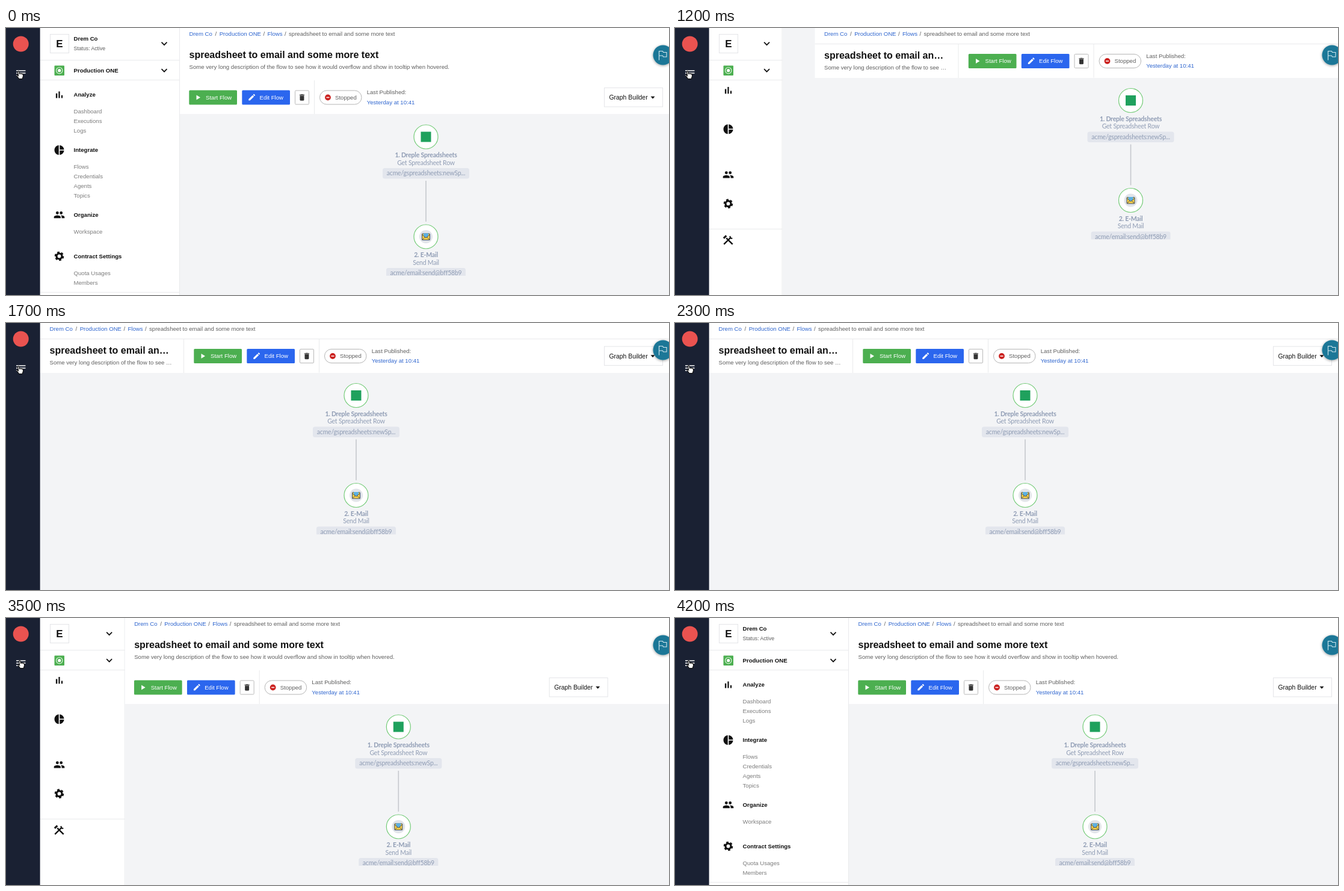
Recreate the animation shown at these times as an HTML page. Size 1102x444 px, loop 4400 ms.

```html
<!DOCTYPE html>
<html lang="en">
<head>
<meta charset="utf-8">
<title>Collapsing side menu</title>
<style>
  html, body { margin: 0; width: 100%; height: 100%; overflow: hidden; background: #f3f4f6; }
  svg { display: block; width: 1102px; height: 444px; }
  text { font: 9.6px "Liberation Sans", Arial, sans-serif; fill: #5f5f5f; white-space: pre; }
  .b { font-weight: bold; fill: #111; }
  .title { font-size: 16px; }
  .link { fill: #2f66cf; }
  .sub { fill: #7c7c7c; }
  .on { fill: #fff; }
  .rule { stroke: #e9eaec; fill: none; }
  .box { stroke: #e4e5e8; fill: #fff; }
  .graph text { font: 10.5px Lato, sans-serif; letter-spacing: -.2px; fill: #8f9cb4; text-anchor: middle; }
  .graph .h { font-weight: bold; }
  .tag { fill: #e3e6ed; }
  .ring { fill: #fff; stroke: #74cb78; stroke-width: 1.2; }
  .chev { fill: none; stroke: #111; stroke-width: 1.7; }
</style>
</head>
<body>
<svg viewBox="0 0 1102 444">
  <defs>
    <clipPath id="sideClip"><rect id="sideCut" x="56" y="0" width="233" height="444"/></clipPath>
    <clipPath id="graphClip"><rect x="-200" y="143" width="400" height="269"/></clipPath>
    <filter id="shade" x="-30%" y="-30%" width="160%" height="160%">
      <feDropShadow dx="0" dy="1" stdDeviation="2" flood-opacity=".4"/>
    </filter>
  </defs>
  <rect width="1102" height="444" fill="#f3f4f6"/>

  <g id="graph" class="graph"><g clip-path="url(#graphClip)">
    <path d="M0 254V322" stroke="#c5c8cd" stroke-width="1.6"/>
    <circle class="ring" cy="181" r="20"/>
    <rect x="-8.500" y="172.500" width="17" height="17" fill="#1fa15d"/>
    <text class="h" y="215">1. Dreple Spreadsheets</text>
    <text y="227.500">Get Spreadsheet Row</text>
    <rect class="tag" x="-72" y="233" width="144" height="17.500" rx="3.500"/>
    <text y="245">acme/gspreadsheets:newSp...</text>
    <circle class="ring" cy="347" r="20"/>
    <circle cy="347" r="11" fill="#e1e4e9"/>
    <rect x="-6.500" y="342" width="13" height="10.500" rx="1" fill="#fbcf45" stroke="#3d4c60"/>
    <path d="M-4 341.500H4V345.500L0 348.500L-4 345.500Z" fill="#5bb0e2"/>
    <path d="M-6.500 343.500L0 349L6.500 343.500M-6.500 352.500L-1.800 348M6.500 352.500L1.800 348" fill="none" stroke="#3d4c60"/>
    <text class="h" y="381">2. E-Mail</text>
    <text y="393.500">Send Mail</text>
    <rect class="tag" x="-66" y="399" width="132" height="17.500" rx="3.500"/>
    <text y="411">acme/email:send@bff58b9</text>
  </g></g>

  <g id="main">
    <rect id="head" width="1045" height="143" fill="#fff"/>
    <g>
      <text class="link" x="15.500" y="13">Drem Co</text><text x="58.500" y="13">/</text>
      <text class="link" x="65.700" y="13">Production ONE</text><text x="138.500" y="13">/</text>
      <text class="link" x="145.500" y="13">Flows</text><text x="174" y="13">/</text>
      <text x="181" y="13">spreadsheet to email and some more text</text>
    </g>
    <g id="wideTitle">
      <text class="b title" x="15.500" y="50">spreadsheet to email and some more text</text>
      <text x="15.500" y="67.700">Some very long description of the flow to see how it would overflow and show in tooltip when hovered.</text>
    </g>
    <g id="slimTitle">
      <path class="rule" d="M0 26.500H1045M238.500 27V83"/>
      <text class="b title" x="15.500" y="50.700">spreadsheet to email an…</text>
      <text x="15.500" y="68.700">Some very long description of the flow to see …</text>
    </g>
    <g id="tools">
      <rect x="15.300" y="103.500" width="79.700" height="24" rx="1.500" fill="#4caf50"/>
      <path d="M27.500 111.500V119.500L34 115.500Z" fill="#fff"/>
      <text class="on" x="43" y="118.800">Start Flow</text>
      <rect x="103.300" y="103.500" width="79.700" height="24" rx="1.500" fill="#2b66ee"/>
      <path transform="translate(112.500 108) scale(.6)" fill="#fff" d="M3 17.250V21h3.750L17.810 9.940l-3.750-3.750zM20.710 7.040c.39-.39.39-1.020 0-1.410l-2.340-2.340c-.39-.39-1.020-.39-1.410 0l-1.830 1.830 3.750 3.750z"/>
      <text class="on" x="132.500" y="118.800">Edit Flow</text>
      <rect x="191.500" y="104" width="23" height="23" rx="1.500" fill="#fff" stroke="#b9b9b9"/>
      <path transform="translate(196 108.500) scale(.58)" fill="#333" d="M6 19c0 1.100.9 2 2 2h8c1.100 0 2-.9 2-2V7H6zM19 4h-3.500l-1-1h-5l-1 1H5v2h14z"/>
      <path class="rule" d="M223.500 87V143"/>
      <rect x="232.500" y="104" width="69.500" height="23" rx="11.500" fill="#fff" stroke="#b5b5b5"/>
      <circle cx="246" cy="115.500" r="4.900" fill="#cb2220"/>
      <path d="M243.500 115.500h5" stroke="#fff" stroke-width="1.500"/>
      <text x="258" y="118.800">Stopped</text>
      <text x="310.700" y="110.300">Last Published:</text>
      <text class="link" x="310.700" y="126.700">Yesterday at 10:41</text>
    </g>
    <g id="builder">
      <rect class="box" x="705.500" y="99.500" width="97" height="31.500"/>
      <text x="713.500" y="119" style="font-size:10.400px;fill:#111">Graph Builder</text>
      <path d="M782.500 113.700h7l-3.500 4z" fill="#111"/>
    </g>
  </g>

  <g clip-path="url(#sideClip)">
    <rect x="56" width="233" height="444" fill="#fff"/>
    <path class="rule" d="M57 53.500H289M57 86.500H289"/>
    <rect class="box" x="73.500" y="10.500" width="31" height="31"/>
    <text class="b" x="88.800" y="32" text-anchor="middle" style="font-size:17px">E</text>
    <rect x="80.500" y="62.500" width="16.500" height="16.500" rx="1" fill="#4caf50"/>
    <circle cx="88.700" cy="70.700" r="5.200" fill="none" stroke="#d8f2d9" stroke-width="1.200"/>
    <circle cx="88.700" cy="70.700" r="2.600" fill="#fff"/>
    <g class="label">
      <text class="b" x="112.500" y="21">Drem Co</text>
      <text x="112.500" y="36.700" style="font-size:8.700px">Status: Active</text>
      <text class="b" x="112.500" y="73.700">Production ONE</text>
    </g>
    <g id="edge">
      <path class="chev" d="M-30.500 23.700l4.500 4.500l4.500-4.500M-30.500 68.200l4.500 4.500l4.500-4.500"/>
      <path class="rule" d="M-.5 0V444"/>
    </g>
    <g id="menu"></g>
  </g>

  <rect width="56.600" height="444" fill="#1a2133"/>
  <circle cx="24.700" cy="26.500" r="13" fill="#ea5350"/>
  <path d="M17 71h15.500M17 75h15.500M17 79h8" stroke="#fff" stroke-width="1.500"/>
  <g id="ripple" fill="none">
    <circle r="1" stroke="#c9c4b4" stroke-width="3" vector-effect="non-scaling-stroke"/>
    <circle r="1" stroke="#15171d" stroke-width="1.200" vector-effect="non-scaling-stroke"/>
  </g>
  <g id="hand">
    <path transform="scale(1.200)" d="M-2.500-4.500q1-1 2 0l.5 3 1.200-.5 1 .5 1.200-.2.800.8.800.4v2.500l-1.200 3.500h-4.500l-3-4.200q.3-1.300 1.500-.6l.6.500z" fill="#fff" stroke="#111"/>
  </g>

  <circle cx="1092" cy="45" r="16.500" fill="#1d7797" filter="url(#shade)"/>
  <path d="M1085.500 53.500V38.500h6l1 2h5.500v7.500h-5.500l-1-2h-6" fill="none" stroke="#d5e9f0" stroke-width="1.100"/>
</svg>
<script>
const $ = id => document.getElementById(id);
const LOOP = 4400, STEP = 100, SIDE = 232, TOP = 86.5, PACKED = .702;

const icons = {
  bars: '<path d="M5 9.200h3V19H5zM10.600 5h2.800v14h-2.800zm5.600 8H19v6h-2.800z"/>',
  pie: '<path d="M11 2v20c-5.070-.5-9-4.790-9-10s3.930-9.500 9-10zm2.030 0v9H22c-.47-4.740-4.240-8.520-8.970-9zm0 11v9c4.740-.47 8.500-4.250 8.970-9z"/>',
  people: '<circle cx="8" cy="8" r="3"/><circle cx="16" cy="8" r="3"/><path d="M8 13c-2.330 0-7 1.170-7 3.500V19h14v-2.500c0-2.330-4.670-3.500-7-3.500zm8 0c-.29 0-.62.02-.97.05 1.160.84 1.970 1.970 1.970 3.450V19h6v-2.500c0-2.330-4.670-3.500-7-3.500z"/>',
  gear: '<g fill="none" stroke="#111"><circle cx="12" cy="12" r="5.600" stroke-width="4"/><circle cx="12" cy="12" r="8.300" stroke-width="3" pathLength="12" stroke-dasharray="1.100 .9"/></g>',
  repair: '<g fill="none" stroke="#111" stroke-width="3"><path d="M3 20.500L17 6.500M21 20.500L8 7.500"/><path d="M15.500 3.500L16.500 7.500L20.500 8.500" stroke-width="2.600"/><path d="M2.500 8L8 2.500" stroke-width="4"/></g>'
};
const sections = [
  ['bars', 'Analyze', 111, ['Dashboard', 'Executions', 'Logs']],
  ['pie', 'Integrate', 203, ['Flows', 'Credentials', 'Agents', 'Topics']],
  ['people', 'Organize', 310.7, ['Workspace']],
  ['gear', 'Contract Settings', 379.5, ['Quota Usages', 'Members']],
  ['repair', '', 466, []]
];

const row = (y, body, cls = '') => `<g class="row ${cls}" data-y="${y}">${body}</g>`;
const label = (y, cls, str) => row(y, `<text class="${cls}" x="112.500" y="3.400">${str}</text>`, 'label');
$('menu').innerHTML = row(439.5, '<path class="rule" d="M57 0H289"/>') +
  sections.map(([icon, name, y, links]) =>
    row(y, `<g fill="#111" transform="translate(78.900 -9.600) scale(.8)">${icons[icon]}</g>`) +
    label(y, 'b', name) +
    links.map((link, i) => label(y + 28 + 16 * i, 'sub', link)).join('')
  ).join('');
const rows = [...document.querySelectorAll('.row')];
const labels = [...document.querySelectorAll('.label')];

const clamp = x => Math.min(1, Math.max(0, x));

// cubic-bezier(.25, .8, .25, 1)
function swift(x) {
  x = clamp(x);
  let lo = 0, hi = 1;
  for (let i = 0; i < 24; i++) {
    const u = (lo + hi) / 2;
    if (.75 * u * (1 - u) + u ** 3 < x) lo = u; else hi = u;
  }
  const v = 1 - lo;
  return 2.4 * lo * v * v + 3 * lo * lo * v + lo ** 3;
}

const move = (el, x, y) => el.setAttribute('transform', `translate(${x.toFixed(2)} ${y.toFixed(2)})`);

function draw(t) {
  const wide = t < 1200 || t >= 3400;
  const open = t < 1200 ? 1 : wide ? swift((t - 3420) / 400) : 1 - swift((t - 1170) / 400);
  const width = SIDE * open;
  // The panel is gone before the page has finished sliding
  const panel = wide ? width : SIDE * (1 - swift((t - 1170) / 200));
  const lift = wide ? 0 : -60.5;

  $('sideCut').setAttribute('width', panel + 1);
  move($('edge'), 57 + panel, 0);
  move($('main'), 57 + width, 0);
  move($('graph'), wide ? 698 - (SIDE - width) / 2 : 582 + width, lift);
  $('head').setAttribute('height', wide ? 143 : 83);
  $('wideTitle').style.display = wide ? '' : 'none';
  $('slimTitle').style.display = wide ? 'none' : '';
  move($('tools'), wide ? 0 : 240, lift);
  move($('builder'), wide ? 0 : SIDE, lift);

  // Menu rows spread out as their labels fade in
  const late = 1 - clamp((t - 3900) / 300);
  const shown = t < 1200 ? 1 : wide ? 1 - late * late : 0;
  const spread = PACKED + (1 - PACKED) * shown;
  for (const r of rows) move(r, 0, TOP + (r.dataset.y - TOP) * spread);
  for (const l of labels) l.style.opacity = shown;

  const small = t === 1000 || t === 3100;
  const big = t === 1100 || t === 3200 || t === 3300;
  $('ripple').style.display = small || big ? '' : 'none';
  $('ripple').setAttribute('transform', `translate(23 71) scale(${small ? 14 : 24.7})`);
  move($('hand'), t < 2200 ? 22.5 : 24.5, t < 2200 ? 78 : 77);
}

const start = performance.now();
function tick() {
  const t = (performance.now() - start + 8) % LOOP;
  draw(Math.floor(t / STEP) * STEP);
  requestAnimationFrame(tick);
}
tick();
</script>
</body>
</html>
```
